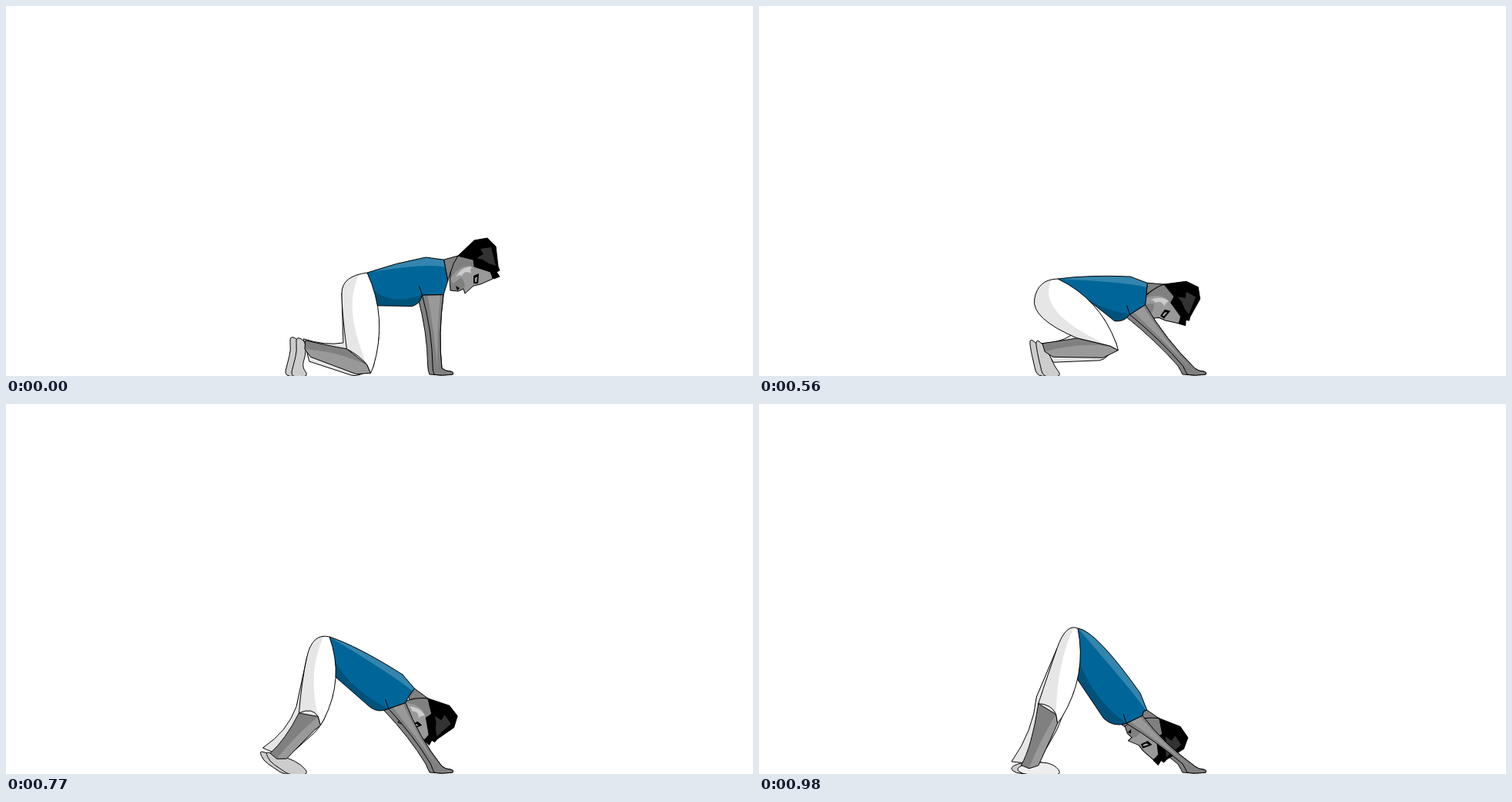
An HTML page with a canvas for the animation above (1.4 s loop, 970x480 px).

```html
<!DOCTYPE html>
<html lang="en">
<head>
<meta charset="utf-8">
<title>Stretch</title>
<style>
html, body { margin: 0; width: 100%; height: 100%; overflow: hidden; background: #fff; }
canvas { display: block; }
</style>
</head>
<body>
<canvas width="970" height="480"></canvas>
<script>
const ctx = document.querySelector('canvas').getContext('2d');
const LOOP = 1400, HOLD = 420, STEP = 70, LAST = 9;

// Joints at the key steps; every outline below is derived from them.
const POSES = [
  { step: 0, hip: [469, 346], shoulder: [545, 326], nape: [587, 324], tilt: [0], knee: [477, 468], ankle: [392, 445] },
  { step: 1, hip: [433, 351], shoulder: [523, 332], nape: [564, 333], tilt: [0], knee: [476, 465], ankle: [392, 445] },
  { step: 3, hip: [388, 354], shoulder: [482, 351], nape: [526, 361], tilt: [36], knee: [464, 438], ankle: [375, 447] },
  { step: 4, hip: [410, 331], shoulder: [498, 355], nape: [540, 378], tilt: [54], knee: [455, 433], ankle: [367, 446] },
  { step: 6, hip: [420, 302], shoulder: [515, 351], nape: [548, 382], tilt: [62], knee: [413, 409], ankle: [354, 457] },
  { step: 9, hip: [414, 291], shoulder: [495, 375], nape: [520, 408], tilt: [65], knee: [393, 407], ankle: [352, 469] }
];
const WRIST = [558, 470], BALL = [369, 482], TOE = [394, 481], INSTEP = [384, 468];

const lerp = (a, b, k) => a.map((v, i) => v + (b[i] - v) * k);
const add = (p, dx, dy) => [p[0] + dx, p[1] + dy];
const quad = (a, b, c, t) => lerp(lerp(a, b, t), lerp(b, c, t), t);
const degrees = (a, b) => Math.atan2(b[1] - a[1], b[0] - a[0]) * 180 / Math.PI;

// Coordinates along (u) and clockwise across (v) the bone from a to b.
function bone(a, b) {
  const length = Math.hypot(b[0] - a[0], b[1] - a[1]);
  const x = (b[0] - a[0]) / length, y = (b[1] - a[1]) / length;
  return { length, at: (u, v) => add(a, u * x - v * y, u * y + v * x) };
}

// The last stretch slows down, the others run evenly.
function poseAt(step) {
  const next = Math.max(1, POSES.findIndex(p => p.step >= step));
  const from = POSES[next - 1], to = POSES[next];
  let k = (step - from.step) / (to.step - from.step);
  if (to.step === LAST) k = 1 - (1 - k) ** 2.5;
  const pose = {};
  for (const joint of Object.keys(from).slice(1)) pose[joint] = lerp(from[joint], to[joint], k);
  return pose;
}

function outlineThigh({ hip, knee, shoulder }, swing) {
  const { length, at } = bone(hip, knee);
  const lean = degrees(hip, knee), backAngle = degrees(hip, shoulder) * Math.PI / 360;
  const reach = 33 - 16 * swing, foldAt = 45 + .6 * lean;
  return {
    hip, knee,
    rear: add(hip, -reach * Math.cos(backAngle), -reach * Math.sin(backAngle)),
    seat: add(hip, -33 + 6 * swing, 26),
    fold: at(foldAt, 33),
    farFold: at(foldAt - 8, 37),
    hemCurve: at(length - 15, 16),
    hem: at(length - 3, 8),
    cap: at(length + 8, 4),
    front: at(length * .49, -23)
  };
}

function outlineTorso({ hip, shoulder }, thigh, swing) {
  const { length, at } = bone(hip, shoulder);
  const fromShoulder = (u, v) => at(length + u, v);
  return {
    hip, shoulder,
    arch: at(length * (.5 - .35 * swing ** 2), -3 - 12 * swing ** 3),
    neck: fromShoulder(22, 9),
    throat: fromShoulder(20, 37 - 24 * swing),
    sleeve: fromShoulder(9 + 14 * Math.sqrt(swing), 53 - 35 * swing),
    armpit: fromShoulder(-17 + 33 * swing, 46 + 18 * swing - 24 * swing ** 2),
    belly: fromShoulder(-33 + 24 * swing, 57),
    waist: quad(hip, thigh.front, thigh.knee, .36 + .2 * swing)
  };
}

function shape(d, fill, outlined = true) {
  const path = new Path2D(d);
  if (fill) { ctx.fillStyle = fill; ctx.fill(path); }
  if (outlined) ctx.stroke(path);
}

// Fills d, draws shades ([path, colour]) inside it, then its outline.
function shaded(d, fill, shades) {
  ctx.save();
  ctx.clip(new Path2D(d));
  shape(d, fill, false);
  for (const [path, color] of shades) shape(path, color, false);
  ctx.restore();
  shape(d);
}

function smooth(points) {
  const n = points.length;
  const mid = i => lerp(points[i % n], points[(i + 1) % n], .5);
  return `M${mid(n - 1)}` + points.map((p, i) => `Q${p} ${mid(i)}`).join('') + 'Z';
}

function drawFoot({ ankle, knee }, dx, dy, color) {
  const flat = Math.max(0, (ankle[1] - 445) / 24);
  const heel = add(ankle, -16 - 2 * flat, (ankle[1] - 458) * .45);
  const heelBottom = add(heel, 2 + 6 * flat, 8 - 2 * flat);
  const points = [
    bone(ankle, knee).at(-5, -9),
    add(heel, 0, -11 * (1 - flat)),
    heelBottom,
    lerp(heelBottom, BALL, .5),
    BALL, TOE, INSTEP,
    add(lerp(ankle, INSTEP, .38), 0, -5 * flat)
  ];
  shape(smooth(points.map(p => add(p, dx, dy))), color);
}

function drawLowerLegs({ ankle, knee }, thigh) {
  const { length, at } = bone(ankle, knee);
  const bend = length - 73;

  const cuff = at(6, 6 + .6 * bend), calf = at(length - 14, 2 + 1.1 * bend);
  shape(`M${thigh.seat}Q${lerp(thigh.seat, thigh.farFold, .5)} ${thigh.farFold}
    Q${lerp(thigh.farFold, ankle, .5)} ${at(-9, .85 * bend - 24)}L${cuff} ${lerp(cuff, calf, .85)}
    Q${calf} ${knee}L${quad(thigh.hip, thigh.front, knee, .7)}Z`, '#e6e6e6');

  drawFoot({ ankle, knee }, 0, 0, bend < 2 ? '#eee' : '#ccc');

  const heel = at(-4, 1), shinTop = at(length * .27, -11), below = at(length - 19, bend), cuffNear = at(6, 9);
  const lower = `${thigh.cap} ${below} ${cuffNear}Z`;
  shaded(`M${at(-6, -10)}Q${shinTop} ${thigh.fold}L${thigh.hem} ${lower.slice(0, -1)} ${heel}Z`, '#808080', [
    [`M${heel}Q${at(length * .45, -7)} ${thigh.hem}L${lower}`, '#999']
  ]);
}

function drawThigh({ hip, rear, seat, fold, hemCurve, hem, cap, knee, front }) {
  const rearEdge = `M${hip}Q${rear} ${seat}T${fold}Q${hemCurve} ${hem}`;
  shaded(`${rearEdge}L${cap} ${knee}Q${front} ${hip}Z`, '#fff', [
    [`${rearEdge}Q${add(seat, 0, 18)} ${lerp(hip, rear, .3)}Z`, '#e6e6e6']
  ]);
}

function drawArm(back, front, wristX, light) {
  const wrist = [wristX - (556 - back[0]) * .06, 467];
  const elbowBack = add(lerp(back, wrist, .5), 6, 0);
  const elbowFront = add(lerp(front, [566, 470], .5), -6, 4);
  const d = `M${back}Q${elbowBack} ${wrist}Q${wristX - 1} 474 ${wristX + 1} 478
    Q565 480 580 478Q582 475 577 474Q571 474 566 470Q${elbowFront} ${front}Z`;
  const glow = `M${lerp(back, front, .25)}L${lerp(back, front, .85)}
    Q${lerp(elbowBack, elbowFront, .8)} 560 470Q${lerp(elbowBack, elbowFront, .4)} ${lerp(back, front, .25)}Z`;
  shaded(d, '#808080', light ? [[glow, '#999']] : []);
}

function drawHead({ nape, tilt: [tilt] }, { neck, throat }) {
  const a = tilt * Math.PI / 180, cos = Math.cos(a), sin = Math.sin(a);
  const jaw = add(nape, -10 * cos - 22 * sin, -10 * sin + 22 * cos);
  shape(`M${neck}L${nape} ${jaw} ${throat}Z`, '#808080');
  ctx.save();
  ctx.translate(...nape);
  ctx.rotate(a);
  shaded('M0 0L20 5 42 14 45 30 29 37 20 39 9 49 7 43 0 46 -10 45Q-14 20 0 0Z', '#808080', [
    ['M-10 30Q5 8 20 15L44 22 45 30 29 37 20 39 9 49 8 43Q10 34 4 28L-6 36Z', '#999'],
    ['M-3 28Q4 14 18 14Q15 18 17 23Q9 18 5 26Q0 24 -3 28Z', '#ccc']
  ]);
  shape('M-3 39L2 42 -1 45Z', '#000', false);
  shape('M20 26L27 23 26 36 20 36Z', '#000', false);
  shape('M22 29L25 27 24 34 22 34Z', '#aaa', false);
  shape('M0 0L21 -20 38 -23 49 -12 52 14 54 19 50 21 54 27 46 30 42 21 21 14 20 5Z', '#000');
  shape('M29 -9L43 -11 49 13 40 10 32 5 24 3 33 -2Z', '#333', false);
  ctx.restore();
}

function drawTorso({ hip, arch, shoulder, neck, throat, sleeve, armpit, belly, waist }) {
  const [dx, dy] = [belly[0] - armpit[0], belly[1] - armpit[1]];
  const chest = add(lerp(armpit, belly, .5), dy * .3, -dx * .3);
  const back = `M${hip}Q${arch} ${shoulder}L${neck}`;
  const under = `Q${chest} ${belly}L${waist}`;
  shaded(`${back}L${throat} ${sleeve} ${armpit}${under}Z`, '#069', [
    [`${back}L${lerp(neck, throat, .35)}Q${lerp(shoulder, armpit, .15)} ${hip}Z`, '#3385ad'],
    [`M${lerp(hip, waist, .5)}Q${lerp(waist, belly, .4)} ${armpit}${under}Z`, '#00527a']
  ]);
  shape(`M${armpit}L${add(armpit, -4, -12)}`);
}

function drawPose(pose) {
  // How far the arms have swung from hanging (0) to overhead (1).
  const armAngle = degrees(pose.shoulder, WRIST) - degrees(pose.hip, pose.shoulder);
  const swing = Math.min(1, Math.max(0, (100 - armAngle) / 90));
  const thigh = outlineThigh(pose, swing);
  const torso = outlineTorso(pose, thigh, swing);
  ctx.fillStyle = '#fff';
  ctx.fillRect(0, 0, 970, 480);
  drawFoot(pose, -8, -1, '#ccc');
  drawLowerLegs(pose, thigh);
  drawArm(add(torso.armpit, -6, 2), torso.sleeve, 549, false);
  drawHead(pose, torso);
  drawArm(torso.armpit, torso.sleeve, 555, true);
  drawTorso(torso);
  drawThigh(thigh);
}

ctx.lineJoin = 'round';
ctx.strokeStyle = '#000';
const start = performance.now();

function frame() {
  const t = (performance.now() - start) % LOOP;
  drawPose(poseAt(t < HOLD ? 0 : Math.min(LAST, 1 + Math.floor((t - HOLD) / STEP))));
  requestAnimationFrame(frame);
}
frame();
</script>
</body>
</html>
```
